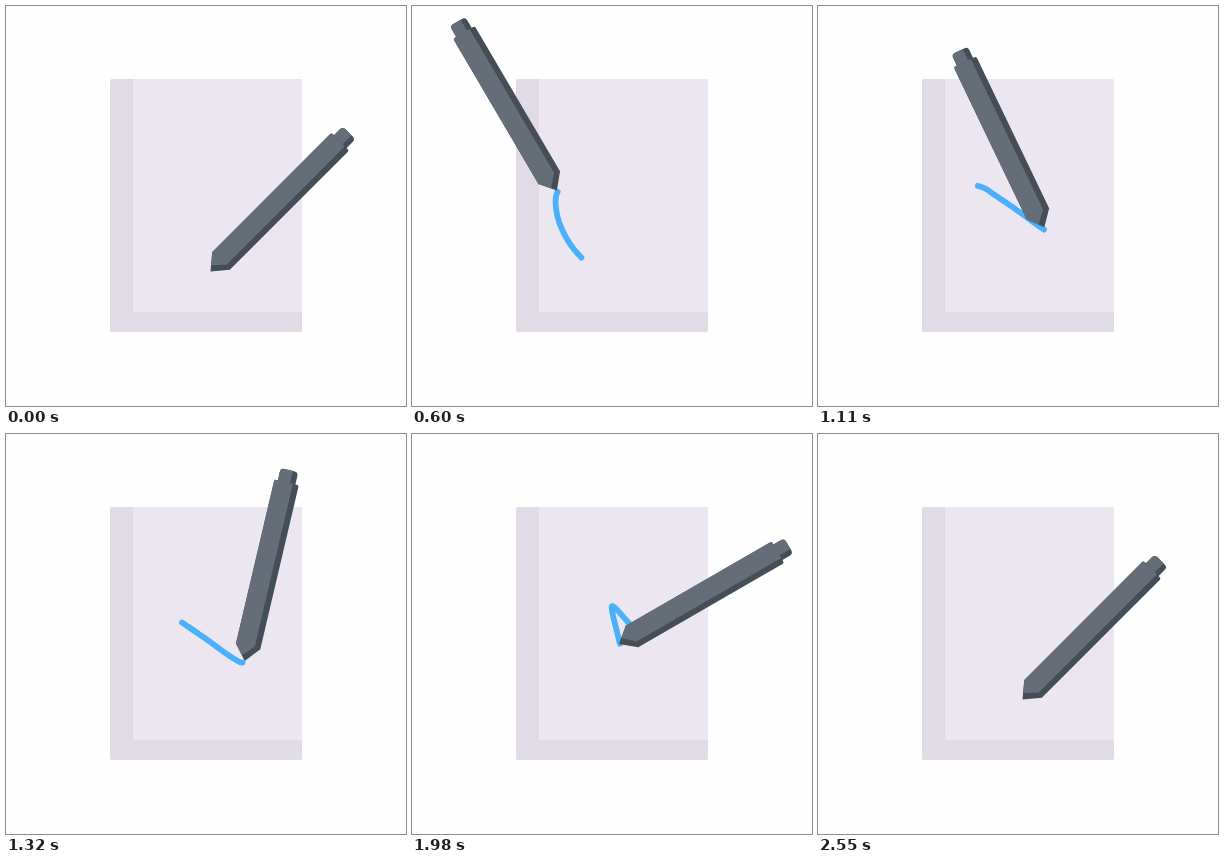
These frames come from a looping animation (400 by 400 pixels, 3.61 s). An HTML page with a canvas:

```html
<!DOCTYPE html>
<html lang="en">
<head>
<meta charset="utf-8">
<title>Pen on paper</title>
<style>
  html, body { margin: 0; width: 100%; height: 100%; overflow: hidden; background: #fefefe; }
  canvas { display: block; width: 400px; height: 400px; }
</style>
</head>
<body>
<canvas id="stage" width="400" height="400"></canvas>
<script>
const ctx = document.getElementById('stage').getContext('2d');
const LOOP = 3610, MOVE_END = 2550, STEP = 30;

// Pen tip over time: ms, x, y, tilt in degrees
const penKeys = [
  [0, 204.5, 265.5, 45], [200, 190, 265, 31], [390, 167, 247.3, 2.4],
  [540, 143.5, 200, -22], [605, 145.5, 184, -31], [720, 167, 182, -42],
  [870, 195.3, 200, -48.5], [1080, 223, 219, -30], [1230, 237, 228, -3],
  [1320, 238.7, 227, 13.2], [1470, 232, 211, 32], [1620, 215.5, 190, 48],
  [1770, 197.7, 174.4, 60.2], [1850, 199, 184, 60.8], [1980, 207, 210, 60],
  [2190, 217.2, 253.4, 53.4], [2350, 211.5, 262.5, 48], [2550, 204.5, 265.5, 45]
];

// Ink line; head and tail are positions along these points
const line = [
  [207, 267], [196, 267.5], [180, 261], [161, 242], [149, 221], [144, 202],
  [145, 187], [154, 179.5], [166, 182], [176, 188.5], [190, 198], [205, 208.5],
  [220, 219.5], [231, 226.5], [236.5, 228.5], [238, 222], [231, 205], [215, 187],
  [202, 173], [200, 176.5], [206, 202], [212, 228], [214.5, 253], [211, 261], [205, 266]
];
const headKeys = [
  [0, 0], [200, 1.2], [390, 3], [540, 5.1], [605, 6.2], [720, 8], [870, 10],
  [1080, 12.2], [1230, 13.6], [1320, 14], [1620, 17], [1770, 18.2],
  [1850, 19.3], [1980, 20.3], [2190, 22], [2550, 24]
];
const tailKeys = [
  [0, 0], [390, 0], [540, 2.05], [870, 4.4], [1080, 7.2], [1320, 9],
  [1620, 11.5], [1770, 13], [1980, 16.3], [2190, 19], [2370, 22], [2550, 24]
];

const clamp = (v, lo, hi) => Math.min(hi, Math.max(lo, v));

function hermite(a, b, ma, mb, u) {
  const u2 = u * u, u3 = u2 * u;
  return a * (2 * u3 - 3 * u2 + 1) + ma * (u3 - 2 * u2 + u)
       + b * (3 * u2 - 2 * u3) + mb * (u3 - u2);
}

// Smooth value of column c at time t, at rest at both ends
function track(keys, c, t) {
  const last = keys.length - 1;
  let i = 0;
  while (i < last - 1 && t >= keys[i + 1][0]) i++;
  const slope = k => k === 0 || k === last ? 0
    : (keys[k + 1][c] - keys[k - 1][c]) / (keys[k + 1][0] - keys[k - 1][0]);
  const span = keys[i + 1][0] - keys[i][0];
  return hermite(keys[i][c], keys[i + 1][c], slope(i) * span, slope(i + 1) * span,
    (t - keys[i][0]) / span);
}

function linePoint(s) {
  const last = line.length - 1;
  const i = Math.min(Math.floor(s), last - 1);
  const at = k => line[clamp(k, 0, last)];
  return [0, 1].map(c => hermite(at(i)[c], at(i + 1)[c],
    (at(i + 1)[c] - at(i - 1)[c]) / 2, (at(i + 2)[c] - at(i)[c]) / 2, s - i));
}

function box(color, x, y, w, h, r) {
  ctx.fillStyle = color;
  ctx.beginPath();
  ctx.roundRect(x, y, w, h, r);
  ctx.fill();
}

function poly(color, points) {
  ctx.fillStyle = color;
  ctx.beginPath();
  points.forEach(p => ctx.lineTo(p[0], p[1]));
  ctx.fill();
}

function drawPaper() {
  box('#e1dbe6', 104, 73, 192, 253, 2);
  box('#ebe6f0', 127, 73, 169, 233, [0, 2, 0, 0]);
}

function drawInk(t) {
  const end = line.length - 1;
  const head = clamp(track(headKeys, 1, t), 0, end);
  const tail = clamp(track(tailKeys, 1, t), 0, end);
  if (head - tail < 0.01) return;
  ctx.strokeStyle = '#4bb0fa';
  ctx.lineWidth = 5.8;
  ctx.lineCap = ctx.lineJoin = 'round';
  ctx.beginPath();
  const n = Math.ceil((head - tail) * 10);
  for (let k = 0; k <= n; k++) ctx.lineTo(...linePoint(tail + (head - tail) * k / n));
  ctx.stroke();
}

function drawPen(t) {
  const light = '#656e78', dark = '#454d57';
  ctx.save();
  ctx.translate(track(penKeys, 1, t), track(penKeys, 2, t));
  ctx.rotate(track(penKeys, 3, t) * Math.PI / 180);
  box(dark, -9, -196, 18, 20, 4);
  box(light, -9, -196, 12.5, 20, [4, 0, 0, 0]);
  box(dark, -12.5, -183.5, 25, 169, [2, 2, 0, 0]);
  poly(dark, [[-12.5, -15], [0, 0], [12.5, -15]]);
  box(light, -12.5, -183.5, 19, 167, [2, 0, 0, 0]);
  poly(light, [[-12.5, -17], [-12.5, -15], [-4, -5], [6.5, -16.5], [6.5, -17]]);
  ctx.restore();
}

const start = performance.now();

function frame() {
  const now = (performance.now() - start) % LOOP;
  const t = Math.min(MOVE_END, Math.floor(now / STEP) * STEP);
  ctx.fillStyle = '#fefefe';
  ctx.fillRect(0, 0, 400, 400);
  drawPaper();
  drawInk(t);
  drawPen(t);
  requestAnimationFrame(frame);
}
frame();
</script>
</body>
</html>
```
